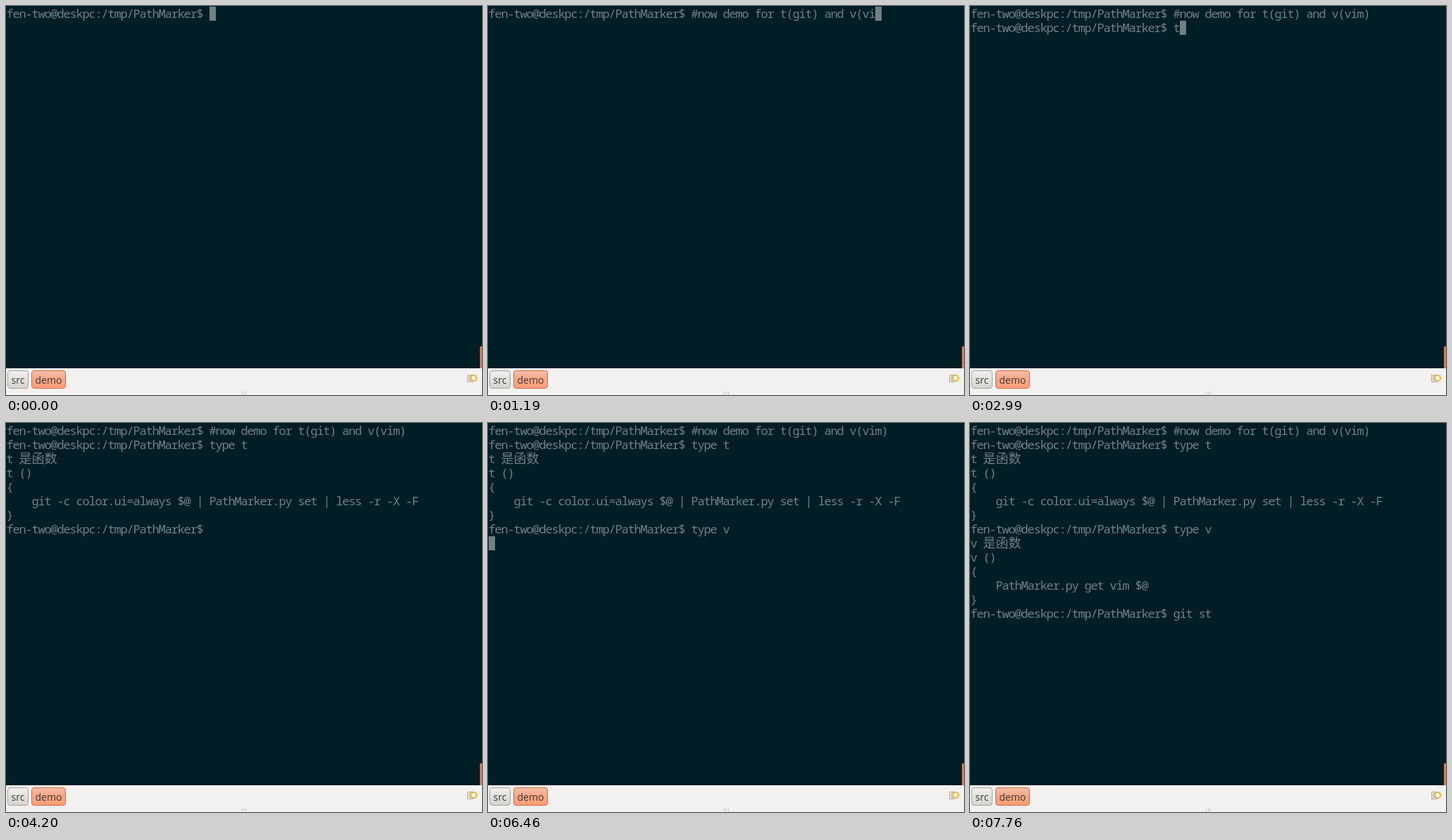
Recreate the animation shown at these times as an HTML page. Size 676 by 553 pixels, loop 8000 ms.

```html
<!DOCTYPE html>
<html lang="en">
<head>
<meta charset="utf-8">
<title>Terminal demo</title>
<style>
  html, body { margin: 0; width: 100%; height: 100%; overflow: hidden; background: #001e26; }
  #stage { position: relative; width: 676px; height: 553px; overflow: hidden; }
  /* Terminal grid: cells of 9 by 20 px */
  #screen {
    position: absolute; left: .4px; top: 1px; margin: 0;
    font: 17px/20px "Noto Sans Mono", monospace; letter-spacing: calc(9px - 1ch);
    font-variant-ligatures: none; color: #708183; white-space: pre;
  }
  #screen span { font: 18px/0 "Noto Sans CJK SC", "Noto Sans CJK", sans-serif; letter-spacing: 0; }
  #cursor { position: absolute; width: 9px; height: 20px; background: #708183; }
  #scroll { position: absolute; left: 673px; top: 484px; width: 3px; height: 31px; background: #dd7a50; }
  #bar { position: absolute; left: 0; top: 515px; width: 676px; height: 38px; background: #f2f1f0; }
  .tab {
    position: absolute; top: 3px; height: 26px; box-sizing: border-box;
    border: 1px solid #a5a29e; border-radius: 4px;
    background: linear-gradient(#f0efed, #d6d4d1);
    font: 14px/25px "Open Sans", sans-serif; color: #3c3b37; text-align: center;
  }
  .active { border-color: #dc6638; background: linear-gradient(#efc0aa, #faa684 45%, #ff9f7a); }
  #bar svg { position: absolute; left: 0; top: 0; }
</style>
</head>
<body>
<div id="stage">
  <pre id="screen"></pre>
  <div id="cursor"></div>
  <div id="scroll"></div>
  <div id="bar">
    <div class="tab" style="left:2px;width:30px">src</div>
    <div class="tab active" style="left:36px;width:49px">demo</div>
    <svg width="676" height="38">
      <path d="M655.5 9.5h7v10h-7zM657 12h4M657 14.5h4M657 17h4" fill="#e4e2df" stroke="#b5b2ad"/>
      <path d="M664 8l1.6 2.2 2.6-.6-.2 2.7 2.2 1.7-2.2 1.7.2 2.7-2.6-.6-1.6 2.2-1.6-2.2-2.6.6.2-2.7-2.2-1.7 2.2-1.7-.2-2.7 2.6.6z" fill="#e8b52a"/>
      <circle cx="664" cy="14" r="3" fill="#fffbe4"/>
      <path d="M335.5 33v4M338.5 33v4M341.5 33v4" stroke="#c9c6c2"/>
    </svg>
  </div>
</div>
<script>
const LOOP = 8000;
const PROMPT = "fen-two@deskpc:/tmp/PathMarker$ ";
const describe = (name, body) => `\n${name} 是函数\n${name} ()\n{\n    ${body}\n}\n${PROMPT}`;

// Each step: time in ms, text added to the screen, cursor visible
const steps = [];
const add = (time, text, cursor = true) => steps.push([time, text, cursor]);

add(0, PROMPT);
const comment = "#now demo for t(git) and v(vi";
const part = k => Math.round(comment.length * k / 5);
for (let i = 0; i < 5; i++) add(790 + i * 100, comment.slice(part(i), part(i + 1)));
add(2110, "m)\n");
add(2130, PROMPT);
add(2990, "t");
add(3160, "y", false);
add(3490, "p", false);
add(3580, "e", false);
add(3920, " t", false);
add(4200, describe("t", "git -c color.ui=always $@ | PathMarker.py set | less -r -X -F"), false);
add(4830, "t", false);
add(5000, "y", false);
add(5280, "p");
add(5380, "e");
add(5670, " ");
add(6210, "v");
add(6460, "\n");
add(6490, describe("v", "PathMarker.py get vim $@").slice(1));
add(7250, "g");
add(7340, "i");
add(7500, "t");
add(7590, " ");
add(7670, "s");
add(7760, "t", false);

const screenEl = document.getElementById("screen");
const cursorEl = document.getElementById("cursor");
let shown = 0;

function draw() {
  const time = performance.now() % LOOP;
  const done = steps.filter(step => step[0] <= time);
  if (done.length !== shown) {
    shown = done.length;
    const text = done.map(step => step[1]).join("");
    const lines = text.split("\n");
    screenEl.innerHTML = text.replace(/[\u4e00-\u9fff]+/g, "<span>$&</span>");
    cursorEl.style.left = 1 + lines.at(-1).length * 9 + "px";
    cursorEl.style.top = 1 + (lines.length - 1) * 20 + "px";
    cursorEl.hidden = !done.at(-1)[2];
  }
  requestAnimationFrame(draw);
}
draw();
</script>
</body>
</html>
```
